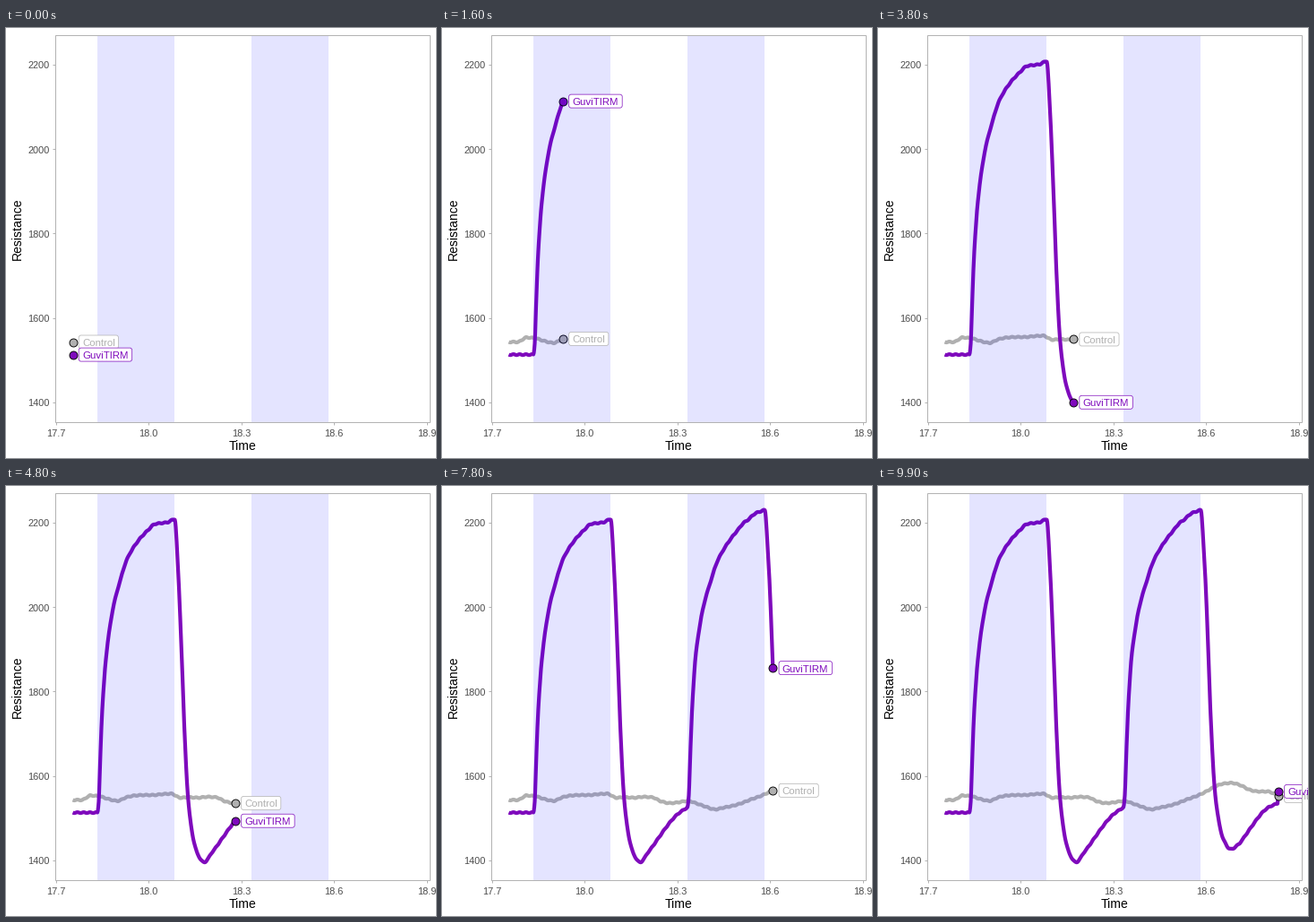
A matplotlib script for the animation above (10000 ms loop, 480 by 480 pixels).

```python
import numpy as np
import matplotlib.pyplot as plt
from matplotlib.animation import FuncAnimation
from matplotlib.patches import FancyBboxPatch, Rectangle

SIZE, DPI, FRAMES = 480, 100, 100
PX = 72 / DPI  # points per pixel
LEFT, RIGHT, TOP, BOTTOM = 55, 472.5, 7.5, 439.5
START, END, STEP = 74.5, 447, 3.78
PULSE, CYCLE = 102.3, 172
GREY, PURPLE = "#b0b0b0", "#7f0abc"

# Response to one light pulse: offset from its onset, height on the stage
RESPONSE = [
    (0, 364.6), (1.2, 352), (2.7, 310), (4.7, 259), (6.7, 225), (8.7, 198),
    (13.7, 157), (17.7, 134), (24.7, 107), (32.7, 82), (45, 61.5),
    (56, 49.5), (64, 42.5), (78, 40.5), (86, 37), (89.7, 92), (93.7, 185),
    (96.9, 273), (100.7, 345), (103.7, 375), (107.7, 398), (111.7, 411),
    (118.7, 420), (127.7, 409), (160, 367), (172, 358.5),
]
# How the second response differs from the first
DRIFT = [
    (0, -6.1), (8.7, -7), (14, -2), (30, 3), (64, -2.5), (78, -11), (86, -10),
    (93, -20), (107, -16), (118, -15), (130, -8), (153, -8), (172, -4.5),
]
# Control heights at every tenth pixel
CONTROL = [
    350.5, 350.5, 345.5, 346.5, 349.5, 351.5, 347.5, 345.5, 345, 345, 344,
    343.5, 348, 347.5, 348, 347, 347.5, 352, 354, 353, 351.5, 354.5, 358,
    361, 359, 357, 354, 350, 346.5, 342, 336.5, 332.5, 331.5, 334, 339, 341,
    341, 344.5, 349,
]


def monotone(x, y):
    """Return a shape-preserving cubic through the points."""
    x, y = np.array(x, float), np.array(y, float)
    h = np.diff(x)
    d = np.diff(y) / h
    a, b = d[:-1], d[1:]
    same = a * b > 0
    m = np.zeros(len(x))
    m[0], m[-1] = d[0], d[-1]
    m[1:-1][same] = 2 * a[same] * b[same] / (a + b)[same]

    def curve(t):
        i = np.clip(np.searchsorted(x, t, side="right") - 1, 0, len(h) - 1)
        s = (t - x[i]) / h[i]
        return (y[i] * (1 + 2 * s) * (1 - s) ** 2
                + h[i] * m[i] * s * (1 - s) ** 2
                + y[i + 1] * s ** 2 * (3 - 2 * s)
                + h[i] * m[i + 1] * s ** 2 * (s - 1))

    return curve


response = monotone(*zip(*RESPONSE))
drift = monotone(*zip(*DRIFT))
base = monotone(START + 10 * np.arange(len(CONTROL)), CONTROL)


def ripple(x):
    return 0.5 * np.sin(0.9 * (x - START))


def control(x):
    return base(x) + ripple(x)


def treated(x):
    t = x - PULSE
    second = t >= CYCLE
    t = np.clip(np.where(second, t - CYCLE, t), 0, CYCLE)
    y = response(t) + np.where(second, drift(t), 0)
    jump = np.clip(x - END + 1, 0, 1)
    return y + ripple(x) - 13.5 * jump


plt.rcParams["font.family"] = "Liberation Sans"
fig = plt.figure(figsize=(SIZE / DPI, SIZE / DPI), dpi=DPI, facecolor="white")
ax = fig.add_axes([0, 0, 1, 1])
ax.set(xlim=(0, SIZE), ylim=(SIZE, 0))
ax.axis("off")
panel = Rectangle((LEFT, TOP), RIGHT - LEFT, BOTTOM - TOP, fill=False,
                  ec="#b3b3b3", lw=PX, zorder=20)
ax.add_patch(panel)


def write(x, y, text, size, color, **kw):
    return ax.text(x, y, text, fontsize=size * PX, color=color,
                   va="baseline", **kw)


def draw_axes():
    tick = dict(color="#b3b3b3", lw=PX, solid_capstyle="butt")
    for k in range(5):
        x = 55.7 + 103.45 * k
        ax.plot([x, x], [BOTTOM, BOTTOM + 3], **tick)
        write(x, 455.5, f"{17.7 + 0.3 * k:.1f}", 11, "#4d4d4d", ha="center")
        y = 418 - 94.3 * k
        ax.plot([LEFT - 3, LEFT], [y, y], **tick)
        write(48.5, y + 4.4, str(1400 + 200 * k), 11, "#4d4d4d", ha="right")
    write(263.7, 471, "Time", 14, "black", ha="center")
    write(17, 224, "Resistance", 14, "black", ha="center", rotation=90,
          rotation_mode="anchor")
    for x in (102, 102 + CYCLE):
        ax.add_patch(Rectangle((x, TOP), 86, BOTTOM - TOP, fc="blue",
                               alpha=0.105, lw=0, zorder=5))


class Trace:
    def __init__(self, name, curve, color, width, order):
        self.curve = curve
        self.line, = ax.plot([], [], color=color, lw=4.2 * PX,
                             zorder=1 + order, solid_capstyle="butt",
                             solid_joinstyle="round")
        self.dot, = ax.plot([], [], "o", ms=9 * PX, mfc=color, mec="black",
                            mew=0.9 * PX, zorder=3 + order)
        self.box = FancyBboxPatch((0, 0), width, 15, fc="white", ec=color,
                                  boxstyle="round,pad=0,rounding_size=2.5",
                                  lw=0.7 * PX, zorder=7 + 2 * order)
        ax.add_patch(self.box)
        self.text = write(0, 0, name, 11.4, color, zorder=8 + 2 * order)
        self.parts = [self.line, self.dot, self.box, self.text]
        for part in self.parts:
            part.set_clip_path(panel)

    def move(self, x):
        xs = np.append(np.arange(START, x, 0.5), x)
        ys = self.curve(xs)
        y = ys[-1]
        self.line.set_data(xs, ys)
        self.dot.set_data([x], [y])
        self.box.set_x(x + 6.7)
        self.box.set_y(y - 7.5)
        self.text.set_position((x + 10.4, y + 4.5))


draw_axes()
traces = [Trace("Control", control, GREY, 44.2, 0),
          Trace("GuviTIRM", treated, PURPLE, 59.5, 1)]


def update(i):
    x = min(START + STEP * i, END)
    for trace in traces:
        trace.move(x)
    return [part for trace in traces for part in trace.parts]


anim = FuncAnimation(fig, update, frames=FRAMES, interval=100,
                     repeat=True, repeat_delay=0, blit=False)
plt.show()
```
